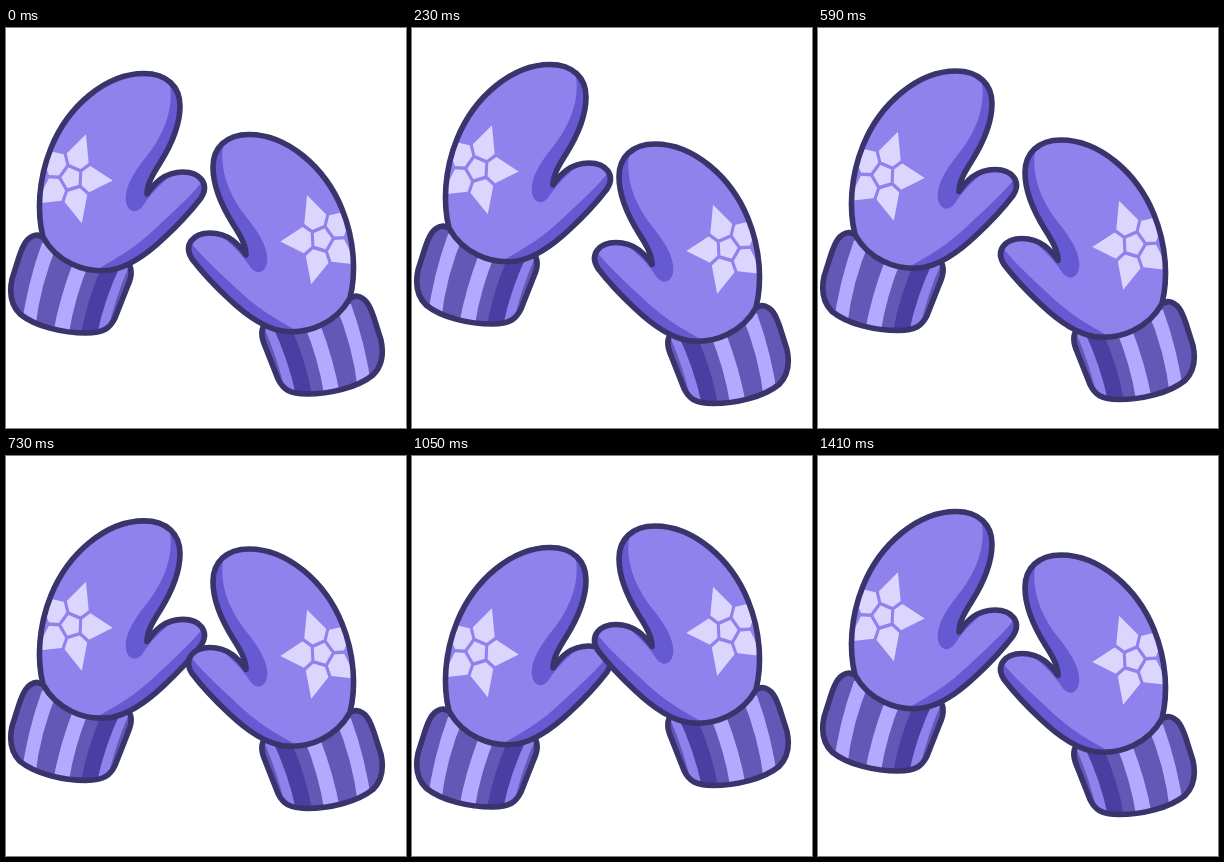
Recreate the animation shown at these times as an HTML page. Size 400 by 400 pixels, loop 1.46 s.

```html
<!DOCTYPE html>
<html lang="en">
<head>
<meta charset="utf-8">
<title>Mittens</title>
<style>
  html, body { margin: 0; width: 100%; height: 100%; overflow: hidden; background: #fff; }
  svg { display: block; width: 100%; height: 100%; }
  .line { fill: none; stroke: #39346b; stroke-width: 5.6; stroke-linejoin: round; stroke-linecap: round; }
</style>
</head>
<body>
<svg viewBox="0 0 400 400">
  <defs>
    <path id="hand" d="M37 209C31 185 32 152 45 120C62 78 100 45.500 138 45.500C161 45.500 174 59 174 78C174 98 164 119 154 135C147 146 141 156 141 166C148 156 158 144 177 144C194 144 204 156 195 170C185 183 172 197 158 210C138 229 122 239 105 242C78 246 50 233 37 209Z"/>
    <path id="cuff" d="M31 207C21 208 17 217 13 229L6 251C3 265 5 277 14 286C30 299 58 305 80 305C98 305 104 300 109 290L122 257C126 248 126 240 122 235Z"/>
    <clipPath id="inHand"><use href="#hand"/></clipPath>
    <clipPath id="inCuff"><use href="#cuff"/></clipPath>
    <g id="mitten">
      <use href="#cuff" fill="#6457b5"/>
      <g clip-path="url(#inCuff)">
        <path fill="#b4a8ff" d="M36 215H52Q34 256 29 302H15Q21 256 36 215ZM67 235H83Q67 274 62 312H46Q52 274 67 235Z"/>
        <path fill="#4b3ea2" d="M96 238H116Q99 274 92 312H74Q80 274 96 238Z"/>
        <path fill="#8f82ec" d="M115 236H124Q107 274 100 312H90Q97 274 115 236Z"/>
      </g>
      <use href="#cuff" class="line"/>
      <use href="#hand" fill="#8f82ec"/>
      <g clip-path="url(#inHand)">
        <path fill="#6759d2" d="M161 45C171 74 160 104 140 129C125 147 118 163 120 174C122 184 130 186 136 179C142 170 148 162 163 149L141 160L180 95V45ZM199 150C188 165 168 183 150 200C130 219 112 230 86 244L72 252H130L205 180Z"/>
        <g id="star" transform="translate(65 150) scale(.97 1.09) rotate(3)"></g>
      </g>
      <use href="#hand" class="line"/>
    </g>
  </defs>
  <g id="left"><use href="#mitten"/></g>
  <g id="right"><use href="#mitten" transform="translate(381 61) scale(-1 1)"/></g>
</svg>
<script>
const LOOP = 1460, FPS = 22;
const $ = id => document.getElementById(id);

function polar(r, deg) {
  const a = deg * Math.PI / 180;
  return [r * Math.cos(a), r * Math.sin(a)].map(v => v.toFixed(2)).join(' ');
}

function drawStar() {
  let outline = '', core = '', seams = '';
  for (let i = 0; i < 5; i++) {
    const a = i * 72;
    outline += `${i ? 'L' : 'M'}${polar(43, a)}L${polar(22, a + 36)}`;
    core += `${i ? 'L' : 'M'}${polar(12, a + 36)}`;
    seams += `M${polar(12, a + 36)}L${polar(24, a + 36)}`;
  }
  $('star').innerHTML = `<path d="${outline}Z" fill="#dcd6fe"/>
    <path d="${core}Z${seams}" fill="none" stroke="#8f82ec" stroke-width="3.2" stroke-linejoin="round"/>`;
}

// Each key: time, left offset, right offset
const keys = [
  [0, 0, 0], [230, -9, 9.5], [375, -19, 19], [550, -7, 9], [590, -2.5, 5.5],
  [860, 37, -29], [1020, 47, -37], [1050, 46, -36.5], [1230, 30, -23.5], [1410, 10, -7.5]
];
const N = keys.length;
const keyAt = i => {
  const k = keys[(i + N) % N], turn = Math.floor(i / N);
  return [k[0] + turn * LOOP, k[1], k[2]];
};
const slope = (i, c) => {
  const a = keyAt(i), b = keyAt(i + 1);
  return (b[c] - a[c]) / (b[0] - a[0]);
};
// Harmonic mean keeps the curve free of overshoot
const tangent = (i, c) => {
  const a = slope(i - 1, c), b = slope(i, c);
  return a * b > 0 ? 2 * a * b / (a + b) : 0;
};

function offset(t, c) {
  let i = N - 1;
  while (keys[i][0] > t) i--;
  const a = keyAt(i), b = keyAt(i + 1), d = b[0] - a[0];
  const u = (t - a[0]) / d, v = 1 - u;
  return a[c] * v * v * (1 + 2 * u) + b[c] * u * u * (3 - 2 * u)
    + d * u * v * (v * tangent(i, c) - u * tangent(i + 1, c));
}

function render(now) {
  const tick = Math.floor((now % LOOP) / 10) * 10;
  const step = Math.floor((tick + 5) * FPS / 1000);
  const t = Math.min(Math.round(step * 100 / FPS) * 10, 1410);
  $('left').setAttribute('transform', `translate(0 ${offset(t, 1).toFixed(2)})`);
  $('right').setAttribute('transform', `translate(0 ${offset(t, 2).toFixed(2)})`);
}

drawStar();
const start = performance.now();
render(0);
requestAnimationFrame(function loop() {
  render(performance.now() - start);
  requestAnimationFrame(loop);
});
</script>
</body>
</html>
```
